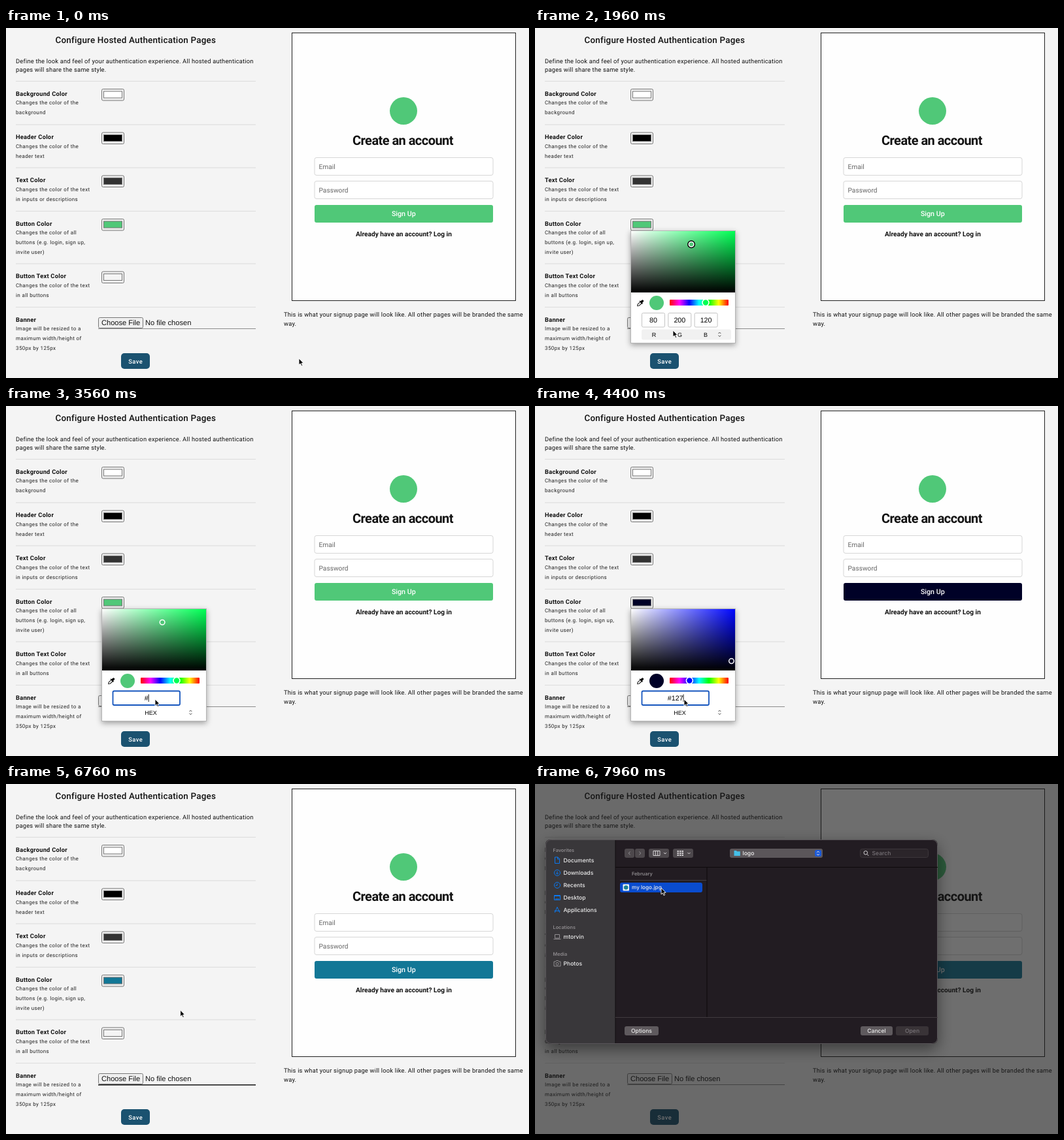
Recreate the animation shown at these times as an HTML page. Size 800 px wide and 536 px high, loop 8000 ms.

```html
<!DOCTYPE html>
<html lang="en">
<head>
<meta charset="utf-8">
<title>Configure pages</title>
<style>
html, body { margin: 0; width: 100%; height: 100%; overflow: hidden; background: #f4f4f4; }
svg { display: block; width: 800px; height: 536px; font-family: Roboto, sans-serif; text-rendering: geometricPrecision; }
.title { font-size: 13.4px; font-weight: 500; letter-spacing: .22px; }
.body { font-size: 9.3px; letter-spacing: .22px; }
.label { font-size: 9.3px; font-weight: 700; letter-spacing: .25px; }
.small { font-size: 8px; letter-spacing: .38px; fill: #222; }
.head { font-size: 20px; font-weight: 700; letter-spacing: -.55px; }
.ph { font-size: 10.2px; fill: #666; }
.sign { font-size: 10.7px; font-weight: 500; fill: #fff; }
.login { font-size: 10.15px; font-weight: 700; }
.save { font-size: 9.3px; font-weight: 500; letter-spacing: .4px; fill: #fff; }
.file { font: 11.1px "Liberation Sans", Arial, sans-serif; }
.num { font: 10.7px "Liberation Sans", Arial, sans-serif; }
.unit { font: 9px "Liberation Sans", Arial, sans-serif; }
.mid { text-anchor: middle; }
#dialog text { font-family: Inter, sans-serif; font-size: 8.6px; font-weight: 500; fill: #eee; }
#dialog .group { font-size: 7.3px; font-weight: 600; fill: #8d8a8d; }
#dialog .name { font-size: 8.2px; }
#dialog .dull { fill: #787378; }
.blue { fill: none; stroke: #0a78f0; stroke-width: 1; }
.gray { fill: none; stroke: #9b989b; stroke-width: .9; }
.pale { fill: none; stroke: #d8d5d8; stroke-width: 1; }
</style>
</head>
<body>
<svg id="stage" viewBox="0 0 800 536"></svg>
<script>
const $ = id => document.getElementById(id);
const text = (x, y, cls, s, id = '') => `<text x="${x}" y="${y}" class="${cls}" id="${id}">${s}</text>`;
const rect = (x, y, w, h, fill, more = '') => `<rect x="${x}" y="${y}" width="${w}" height="${h}" fill="${fill}" ${more}/>`;
const path = (d, cls) => `<path d="${d}" class="${cls}"/>`;

const GREEN = '#50c878';
const rows = [
  [81.5, 'Background Color', ['Changes the color of the', 'background'], '#fff'],
  [148, 'Header Color', ['Changes the color of the', 'header text'], '#000'],
  [214, 'Text Color', ['Changes the color of the text', 'in inputs or descriptions'], '#333'],
  [280.5, 'Button Color', ['Changes the color of all', 'buttons (e.g. login, sign up,', 'invite user)'], GREEN],
  [361, 'Button Text Color', ['Changes the color of the text', 'in all buttons'], '#f4f4f4'],
  [427.5, 'Banner', ['Image will be resized to a', 'maximum width/height of', '350px by 125px']]
];

const row = ([y, label, lines, color], i) =>
  rect(15, y - .5, 367, 1, '#dcdcdc') + text(15, y + 22, 'label', label) +
  lines.map((s, k) => text(15, y + 35.7 + k * 14.8, 'small', s)).join('') +
  (color ? rect(146.5, y + 12, 34, 17.5, '#efefef', 'rx="2" stroke="#777"') +
    rect(149.5, y + 15.5, 28, 10, color, `stroke="#777" id="swatch${i}"`) : '');

const field = (y, s) => rect(472, y, 273, 27, '#fff', 'rx="3" stroke="#d6d6d6"') + text(478.5, y + 17.3, 'ph', s);

const page = text(198.3, 23.3, 'title mid', 'Configure Hosted Authentication Pages') +
  text(15, 53.5, 'body', 'Define the look and feel of your authentication experience. All hosted authentication') +
  text(15, 67.3, 'body', 'pages will share the same style.') +
  rows.map(row).join('') +
  rect(141.5, 443.5, 68, 16, '#efefef', 'rx="2" stroke="#777"') +
  text(146, 455, 'file', 'Choose File') + text(213, 455, 'file', 'No file chosen') +
  rect(141, 460, 241, 1, '#8c8c8c', 'id="line"') + rect(0, 459.7, 0, 2, '#2a62b0', 'id="focus"') +
  rect(176, 498, 44, 24, '#1b5270', 'rx="5"') + text(198.2, 513.6, 'save mid', 'Save') +
  rect(437.5, 7.5, 342, 410, '#fefefe', 'stroke="#222"') +
  `<circle cx="608" cy="127" r="21" fill="${GREEN}"/>` +
  text(530, 178.5, 'head', 'Create an account') +
  field(198.5, 'Email') + field(234.5, 'Password') +
  rect(472, 271, 273, 27, GREEN, 'rx="3" id="button"') + text(608.3, 288.2, 'sign mid', 'Sign Up') +
  text(608.5, 318.6, 'login mid', 'Already have an account? Log in') +
  text(425, 441.7, 'body', 'This is what your signup page will look like. All other pages will be branded the same') +
  text(425, 455.5, 'body', 'way.');

const box = i => rect(163.5 + 40.3 * i, 436.5, 35, 21.5, '#fff', 'rx="2" stroke="#c4c4c4"') +
  text(181 + 40.3 * i, 451, 'num mid', '', 'num' + i) + text(182 + 39.5 * i, 472.5, 'unit mid', '', 'unit' + i);

const hueStops = [0, 1, 2, 3, 4, 5, 6].map(i =>
  `<stop offset="${i / 6}" stop-color="hsl(${360 - i * 60},100%,50%)"/>`).join('');

const picker = rect(146.5, 310.5, 160, 172, '#fff', 'stroke="#b5b5b5" filter="url(#soft)"') +
  rect(147, 311, 159, 94, '#0f0', 'id="tone"') + rect(147, 311, 159, 94, 'url(#white)') + rect(147, 311, 159, 94, 'url(#black)') +
  '<g id="mark"><circle r="5" fill="none" stroke="#000" stroke-width="2" id="ring"/><circle r="3.8" stroke="#fff" stroke-width="1.5" id="dot"/></g>' +
  '<g transform="translate(161 421.5) rotate(45)"><rect x="-1.7" y="-6.5" width="3.4" height="4.5" rx="1.5"/><rect x="-3" y="-2.6" width="6" height="1.6"/><path d="M-1.5 -1V4L0 6L1.5 4V-1" fill="none" stroke="#000"/></g>' +
  '<circle cx="186" cy="421" r="11" id="chip"/>' + rect(206, 416, 90, 9, 'url(#hues)', 'rx="1"') +
  '<circle cy="420.5" r="5" stroke="#fff" stroke-width="1.6" id="knob"/>' +
  rect(163, 461.5, 137, 16, '#f1f1f1', 'rx="3" id="strip"') +
  `<g id="triple">${box(0)}${box(1)}${box(2)}</g><g id="hexBox">` +
  rect(163.5, 436.5, 102.5, 21.5, '#fff', 'rx="2" id="frame"') + rect(0, 440.5, 0, 13, '#b4d5fe', 'id="select"') +
  text(214.7, 451, 'num mid', '', 'hex') + rect(0, 441.5, .9, 11.5, '#000', 'id="caret"') +
  text(221.5, 472.5, 'unit mid', 'HEX') + '</g>' +
  '<path d="M280.5 468L282.4 466L284.3 468M280.5 470.6L282.4 472.6L284.3 470.6" fill="none" stroke="#333" stroke-width=".9"/>';

const side = [['Documents', 117], ['Downloads', 136], ['Recents', 155], ['Desktop', 174], ['Applications', 193], ['mtorvin', 234], ['Photos', 275]];
const tool = (x, w) => rect(x, 99, w, 14, '#4d484c', 'rx="3"');
const push = (x, w, s, cls, fill) => rect(x, 371, w, 14, fill, 'rx="3"') + text(x + w / 2, 381, 'mid ' + cls, s);
const dialog = rect(16, 85, 600, 313, '#241e22', 'rx="8" filter="url(#deep)"') +
  '<path d="M123 85H24Q16 85 16 93V390Q16 398 24 398H123Z" fill="#39373a"/>' +
  rect(122.5, 85, 1, 313, '#100d0f') +
  '<rect x="16.5" y="85.5" width="599" height="312" rx="8" fill="none" stroke="#595559"/>' +
  text(27.5, 104, 'group', 'Favorites') + text(27.5, 221.7, 'group', 'Locations') + text(27.5, 262.7, 'group', 'Media') +
  side.map(([s, y]) => text(43.5, y + 3, '', s)).join('') +
  path('M30.5 112H35L37.5 114.5V121.5H30.5ZM34.5 112V115H37.5', 'blue') +
  path('M29.5 136a4.5 4.5 0 1 0 9 0a4.5 4.5 0 1 0 -9 0M34 133.5V138M32 136.3L34 138.3L36 136.3', 'blue') +
  path('M29.5 155a4.5 4.5 0 1 0 9 0a4.5 4.5 0 1 0 -9 0M34 152.3V155.3H31.5', 'blue') +
  path('M29.5 170.5H38.5V177.5H29.5ZM29.5 171.5H38.5M31 176H37', 'blue') +
  path('M34 188.5L37.8 197M34 188.5L30.2 197M29.5 194.3H38.5', 'blue') +
  path('M30.5 230.5H37.5V236H30.5ZM28.5 237.5H39.5', 'gray') +
  path('M29 272H31.5L32.5 270.5H35.5L36.5 272H39V279H29ZM32 275.4a2 2 0 1 0 4 0a2 2 0 1 0 -4 0', 'gray') +
  tool(137, 15) + tool(153, 15) + tool(174, 31) + tool(211, 31) +
  path('M145.5 103.5L143.3 106L145.5 108.5M159.5 103.5L161.7 106L159.5 108.5', 'gray') +
  path('M181 102.5H191V109.5H181ZM184.3 102.5V109.5M187.7 102.5V109.5M197 105L199 107L201 105M233.5 105L235.5 107L237.5 105', 'pale') +
  [0, 1, 2].map(c => [0, 1, 2].map(r => rect(217.5 + c * 3.5, 102 + r * 3, 2.5, 2, '#d8d5d8')).join('')).join('') +
  rect(298, 99, 142, 14, '#5b565a', 'rx="3"') +
  '<path d="M304.5 102H308L309 103.2H313.8V110H304.5Z" fill="#45bfe8"/>' + text(317.5, 109, '', 'logo') +
  rect(428, 101, 10, 10, '#1d5bd8', 'rx="2.5"') +
  path('M431 105L433 103L435 105M431 107L433 109L435 107', 'pale') +
  rect(497.5, 99.5, 104, 13, '#2b252a', 'rx="3" stroke="#3c363a"') +
  path('M503 105.3a2.8 2.8 0 1 0 5.6 0a2.8 2.8 0 1 0 -5.6 0M508 107.5L510.3 110', 'pale') + text(515.5, 109, 'dull', 'Search') +
  rect(123, 127, 493, 1, '#0e0a0c') + rect(130, 147, 133, 1, '#453f43') +
  rect(262.5, 128, 1, 229, '#0c090b') + rect(123, 357, 493, 1, '#413b3f') +
  text(148, 140.4, 'group', 'February') + rect(130, 151, 126, 15, '#0a4ccf', 'rx="3" id="picked"') +
  rect(134.5, 153.5, 9.5, 10, '#f2f6f6', 'rx="1"') + '<circle cx="139.2" cy="158.5" r="3.3" fill="#1d8296"/>' +
  text(148, 161.4, 'name', 'my logo.jpg') +
  push(137, 52, 'Options', '', '#5f5a5e') + push(498, 49, 'Cancel', '', '#5f5a5e') + push(552, 50, 'Open', 'dull', '#393337');

const fade = (id, dir, color, a, b) => `<linearGradient id="${id}" ${dir}><stop stop-color="${color}" stop-opacity="${a}"/><stop offset="1" stop-color="${color}" stop-opacity="${b}"/></linearGradient>`;
$('stage').innerHTML = '<defs>' + fade('white', 'x2="1"', '#fff', 1, 0) + fade('black', 'x2="0" y2="1"', '#000', 0, 1) +
  `<linearGradient id="hues">${hueStops}</linearGradient>` +
  '<filter id="soft" x="-20%" y="-20%" width="140%" height="140%"><feDropShadow dx="0" dy="3" stdDeviation="4" flood-opacity=".35"/></filter>' +
  '<filter id="deep" x="-20%" y="-20%" width="140%" height="150%"><feDropShadow dx="0" dy="8" stdDeviation="11" flood-opacity=".45"/></filter></defs>' +
  rect(0, 0, 800, 536, '#f4f4f4') + `<g fill="#111">${page}</g><g id="picker">${picker}</g>` +
  rect(0, 0, 800, 536, '#181818', 'id="dim"') + `<g id="dialog">${dialog}</g>` +
  '<path id="cursor" d="M0 0V10L2.3 7.9L4 11.6L5.6 10.9L4 7.3H7Z" fill="#000" stroke="#fff" stroke-width=".9"/>';

const route = [[0, 448, 506], [400, 448, 506], [1160, 163, 300], [1400, 163, 300], [1960, 211, 463], [2160, 281, 466],
  [2640, 281, 466], [2960, 228, 449], [5720, 228, 449], [6160, 175, 451], [6560, 175, 451], [6960, 357, 243],
  [7260, 357, 243], [7840, 193, 159], [8000, 193, 159]];
const typing = [[0, GREEN], [3360, ''], [3480, '#'], [3880, '#1'], [4120, '#12'], [4320, '#127'], [4560, '#1277'], [4720, '#12779'], [4920, '#127796']];

const clamp = v => Math.min(1, Math.max(0, v));
const span = (t, a, b) => clamp((t - a) / (b - a));
const set = (id, attrs) => { for (const k in attrs) $(id).setAttribute(k, attrs[k]); };
const show = (id, on) => set(id, { display: on ? 'inline' : 'none' });

function pointer(t) {
  const i = route.findIndex(p => p[0] > t), [a, x, y] = route[i - 1], [b, u, v] = route[i];
  const p = span(t, a, b), e = p * p * (3 - 2 * p);
  return [x + (u - x) * e, y + (v - y) * e];
}

function hsv(color) {
  const [r, g, b] = [1, 3, 5].map(i => parseInt(color.substr(i, 2), 16) / 255);
  const max = Math.max(r, g, b), d = max - Math.min(r, g, b);
  const h = !d ? 0 : max === r ? (g - b) / d + 6 : max === g ? (b - r) / d + 2 : (r - g) / d + 4;
  return [h * 60 % 360, max ? d / max : 0, max];
}

function draw(t) {
  const [x, y] = pointer(t);
  set('cursor', { transform: `translate(${x} ${y})` });

  // Unfinished hex input is read as a number padded with zeros
  const typed = typing.filter(k => k[0] <= t).pop()[1];
  const color = typed.length > 1 ? '#' + typed.slice(1).padStart(6, '0') : GREEN;
  set('swatch3', { fill: color });
  set('button', { fill: color });

  const open = t >= 1320 && t < 5240;
  show('picker', open);
  if (open) {
    const [h, s, v] = hsv(color), pure = `hsl(${h},100%,50%)`;
    set('tone', { fill: pure });
    set('knob', { fill: pure, cx: 206 + 90 * (1 - h / 360) });
    set('chip', { fill: color });
    set('dot', { fill: color });
    set('mark', { transform: `translate(${147 + 153.5 * s} ${311 + 94 * (1 - v)})` });
    show('ring', t < 2320);
    show('strip', x > 163 && x < 300 && y > 461 && y < 478);
    const hexMode = t >= 2560, rgbMode = t < 2320;
    show('triple', !hexMode);
    show('hexBox', hexMode);
    (rgbMode ? ['80', '200', '120'] : ['140', '52%', '55%']).forEach((n, i) => {
      $('num' + i).textContent = n;
      $('unit' + i).textContent = (rgbMode ? 'RGB' : 'HSL')[i];
    });
    $('hex').textContent = typed;
    const active = t >= 3000, w = hexMode && typed ? $('hex').getComputedTextLength() : 0;
    set('frame', active ? { stroke: '#1555bd', 'stroke-width': 1.8 } : { stroke: '#c4c4c4', 'stroke-width': 1 });
    set('select', { x: 214.7 - w / 2, width: t >= 3120 && t < 3360 ? w : 0 });
    set('caret', { x: 214.7 + w / 2 });
    show('caret', active && !(t >= 3120 && t < 3360));
  }

  const hover = t >= 5520 && t < 7320;
  set('line', { height: hover ? 1.6 : 1, fill: hover ? '#222' : '#8c8c8c' });
  const w = 38 * Math.min(span(t, 7120, 7200), 1 - span(t, 7200, 7320));
  set('focus', { x: 261.5 - w / 2, width: w });

  const p = span(t, 7200, 7400);
  set('dim', { opacity: t < 7200 ? .32 * span(t, 7100, 7200) : .32 + .3 * span(t, 7200, 7320) });
  set('dialog', {
    opacity: t < 7200 ? .88 * span(t, 7100, 7200) : .88 + .12 * span(t, 7200, 7280),
    transform: `translate(0 ${t < 7200 ? -20 + 6 * span(t, 7100, 7200) : -14 * (1 - p) ** 2})`
  });
  show('dialog', t >= 7110);
  show('picked', t >= 7950);
}

const start = performance.now();
function tick() {
  draw((performance.now() - start) % 8000);
  requestAnimationFrame(tick);
}
tick();
</script>
</body>
</html>
```
